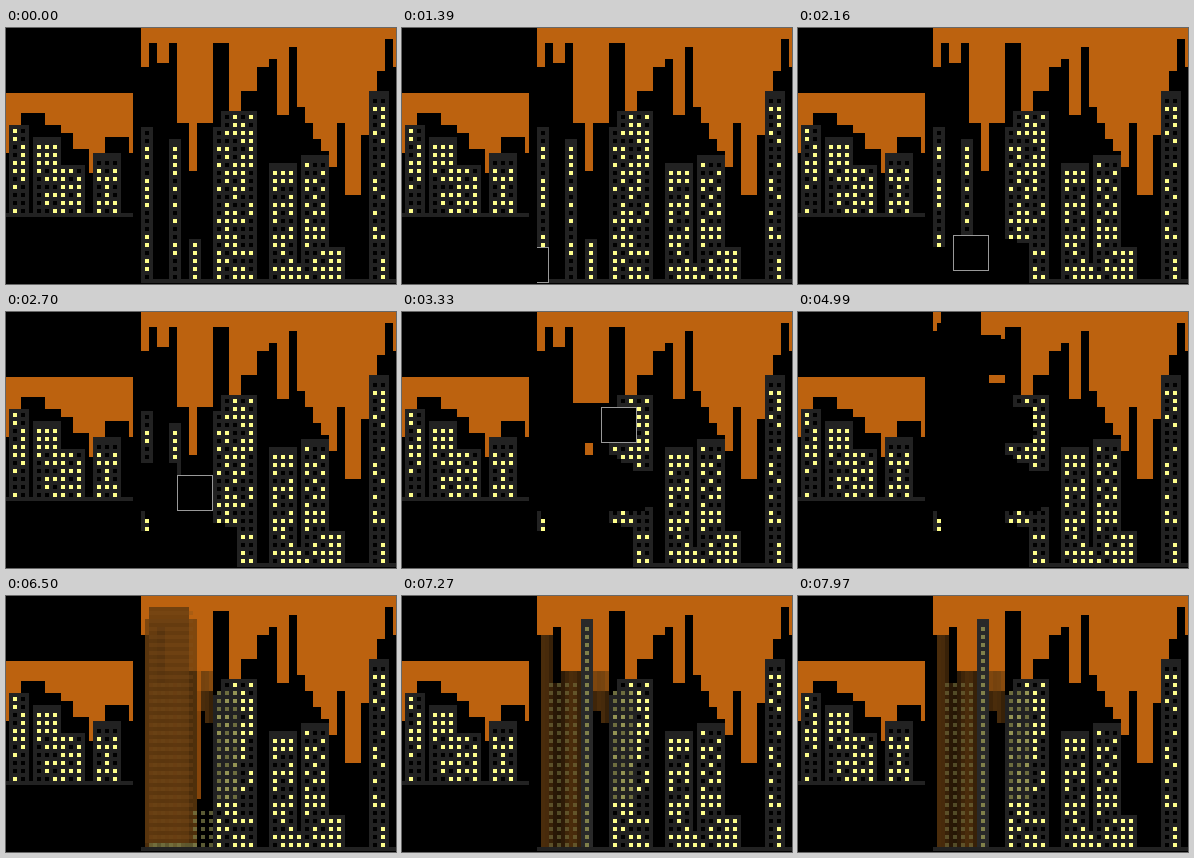
An HTML page with a canvas that plays this animation: 390 by 256 pixels, repeating every 8000 ms.

```html
<!DOCTYPE html>
<html lang="en">
<head>
<meta charset="utf-8">
<title>Pixel skyline</title>
<style>
html, body { margin: 0; width: 100%; height: 100%; overflow: hidden; background: #000; }
canvas { display: block; }
</style>
</head>
<body>
<canvas id="stage" width="390" height="256"></canvas>
<script>
const ctx = document.getElementById('stage').getContext('2d');
const CELL = 4, BRUSH = 9, LOOP = 8000;
const SKY = '#bc620f', WALL = '#222', LIT = '#ffff8c', BROWN = '#60390f', OLIVE = '#80804a';

// sky: [end column, lowest row, row at the end of a staircase]
// towers: [column, width, top row]
const small = {
  x: -1, y: 65, cols: 32, ground: 30, seed: 5,
  sky: [[1, 15], [4, 8], [10, 5], [14, 8], [17, 10], [21, 14], [22, 20], [25, 15], [31, 11], [32, 15]],
  towers: [[1, 5, 8], [13, 7, 18], [7, 7, 11], [22, 7, 15]]
};
const rightSky = [[22, 4], [25, 21], [29, 16], [32, 10], [34, 8], [37, 22], [39, 5],
  [49, 20, 35], [51, 24], [55, 42], [63, 27, 3], [64, 10]];
const large = {
  x: 135, y: -1, cols: 64, ground: 63, seed: 11,
  sky: [[2, 10], [4, 4], [7, 9], [9, 4], [12, 24], [14, 36], [18, 24], ...rightSky],
  towers: [[0, 3, 25], [7, 3, 28], [12, 3, 53], [18, 5, 25], [20, 9, 21], [32, 7, 34],
    [38, 3, 59], [46, 5, 55], [40, 7, 32], [57, 5, 16]]
};
// the large city once its three slim towers are cleared away
const cleared = {
  ...large,
  sky: [[4, 10], [6, 8], [14, 19], [18, 24], ...rightSky],
  towers: large.towers.slice(3)
};

// eraser key points: [step, column, row]
const route = [
  [-11, -6, 55], [-2, 15, 55], [-1, 15, 54], [0, 5, 52], [3, -1, 38], [5, 3, 44], [7, 9, 41],
  [8, 15, 41], [10, 21, 40], [10.6, 16, 40], [11, 11, 36], [11.6, 3, 36], [12, 3, 32],
  [14, -6, 26], [16, 4, 23], [17, 16, 24], [18, 9, 24], [19, 9, 27], [20, 9, 18], [24, 7, 18],
  [25, 0, 22], [30, -8, 34], [34, 0, 6], [36, 3, -2], [36.6, 3, 6], [37.6, 5, 10], [38, 5, 6],
  [39, 13, 7]
];
const hover = [20, 13];

const clamp = v => Math.max(0, Math.min(1, v));
const mix = (a, b, f) => a + (b - a) * f;

function rand(a, b, c) {
  const v = Math.sin(a * 12.99 + b * 78.23 + c * 37.72) * 43758.55;
  return v - Math.floor(v);
}

function fill(s, x, y, w, h, color, alpha = 1) {
  ctx.globalAlpha = alpha;
  ctx.fillStyle = color;
  ctx.fillRect(s.x + x * CELL, s.y + y * CELL, w * CELL, h * CELL);
  ctx.globalAlpha = 1;
}

function tower(s, [x, w, top]) {
  fill(s, x, top, w, s.ground - top, WALL);
  for (let r = s.ground - 1; r > top; r -= 2)
    for (let c = x + 1; c < x + w - 1; c += 2)
      fill(s, c, r, 1, 1, rand(c, r, s.seed) < 0.57 ? LIT : '#000');
}

function city(s) {
  let from = 0;
  for (const [end, row, last = row] of s.sky) {
    const stairs = last === row ? 1 : (end - from) / 2;
    const width = (end - from) / stairs;
    for (let i = 0; i < stairs; i++)
      fill(s, from + i * width, 0, width, Math.round(mix(row, last, i / Math.max(1, stairs - 1))), SKY);
    from = end;
  }
  s.towers.forEach(b => tower(s, b));
  fill(s, 0, s.ground, s.cols, 1, WALL);
}

function erase(step) {
  let spot;
  for (let i = 1; i < route.length && route[i - 1][0] <= step; i++) {
    const [k0, x0, y0] = route[i - 1], [k1, x1, y1] = route[i];
    const part = clamp((step - k0) / (k1 - k0));
    const dabs = Math.max(1, Math.ceil(Math.max(Math.abs(x1 - x0), Math.abs(y1 - y0)) * part));
    for (let j = 0; j <= dabs; j++) {
      const f = part * j / dabs;
      spot = [Math.round(mix(x0, x1, f)), Math.round(mix(y0, y1, f))];
      fill(large, ...spot, BRUSH, BRUSH, '#000');
    }
  }
  return spot;
}

function outline([x, y]) {
  const size = BRUSH * CELL - 1;
  ctx.strokeStyle = '#999';
  ctx.lineWidth = 1;
  ctx.strokeRect(large.x + x * CELL + 0.5, large.y + y * CELL + 0.5, size, size);
}

function dimWindows(x0, x1, y0, y1, alpha) {
  for (let c = x0; c <= x1; c += 2)
    for (let r = y0; r <= y1; r += 2) fill(large, c, r, 1, 1, OLIVE, alpha);
}

// faint towers left behind, uncovered from right to left
function ghosts(step) {
  const reach = Math.max(1, 24 - 2 * step) | 1;
  for (let c = reach; c < 18; c++) {
    const top = c < 4 ? 10 : c < 6 ? 22 : 19;
    const base = c < 14 ? large.ground : c < 16 ? 29 : 32;
    fill(large, c, top, 1, base - top, BROWN, 0.58 + 0.2 * Math.sin(c * 0.9 + 0.4));
  }
  dimWindows(Math.max(19, reach), 23, 24, 50, 0.85);
  dimWindows(Math.max(3, reach), 9, 22, 62, 0.5);
}

function smear(a) {
  if (a <= 0) return;
  fill(large, 14, 18, 1, 33, SKY, 0.7 * a);
  fill(large, 1, 6, 13, 56, BROWN, 0.65 * a);
  fill(large, 2, 3, 10, 59, BROWN, 0.8 * a);
  for (let r = 4; r < 62; r += 2) fill(large, 2, r, 11, 1, '#80521c', 0.3 * a);
  fill(large, 2, 62, 12, 1, OLIVE, 0.6 * a);
  dimWindows(13, 17, 54, 62, 0.7 * a);
}

function slimTower(a) {
  if (a <= 0) return;
  fill(large, 11, 6, 3, 57, '#292929', a);
  dimWindows(12, 12, 8, 62, a);
}

function render(t) {
  ctx.fillStyle = '#000';
  ctx.fillRect(0, 0, 390, 256);
  city(small);
  ctx.save();
  ctx.beginPath();
  ctx.rect(large.x, 0, 255, 256);
  ctx.clip();
  city(t < 5520 ? large : cleared);
  if (t >= 1320 && t < 5520) {
    const step = t < 2160
      ? Math.min(-1, Math.floor((t - 1320) / 75) - 11)
      : Math.floor((t - 2160) / 68.8);
    const spot = erase(step);
    if (t < 4990) outline(step < 40 ? spot : hover);
  } else if (t >= 5520) {
    const step = Math.floor((t - 5520) / 70);
    ghosts(step);
    smear(Math.min(clamp((step - 4) / 8), clamp((25 - step) / 10)));
    slimTower(clamp((step - 16) / 8));
  }
  ctx.restore();
}

function loop(now) {
  render(now % LOOP);
  requestAnimationFrame(loop);
}
render(0);
requestAnimationFrame(loop);
</script>
</body>
</html>
```
